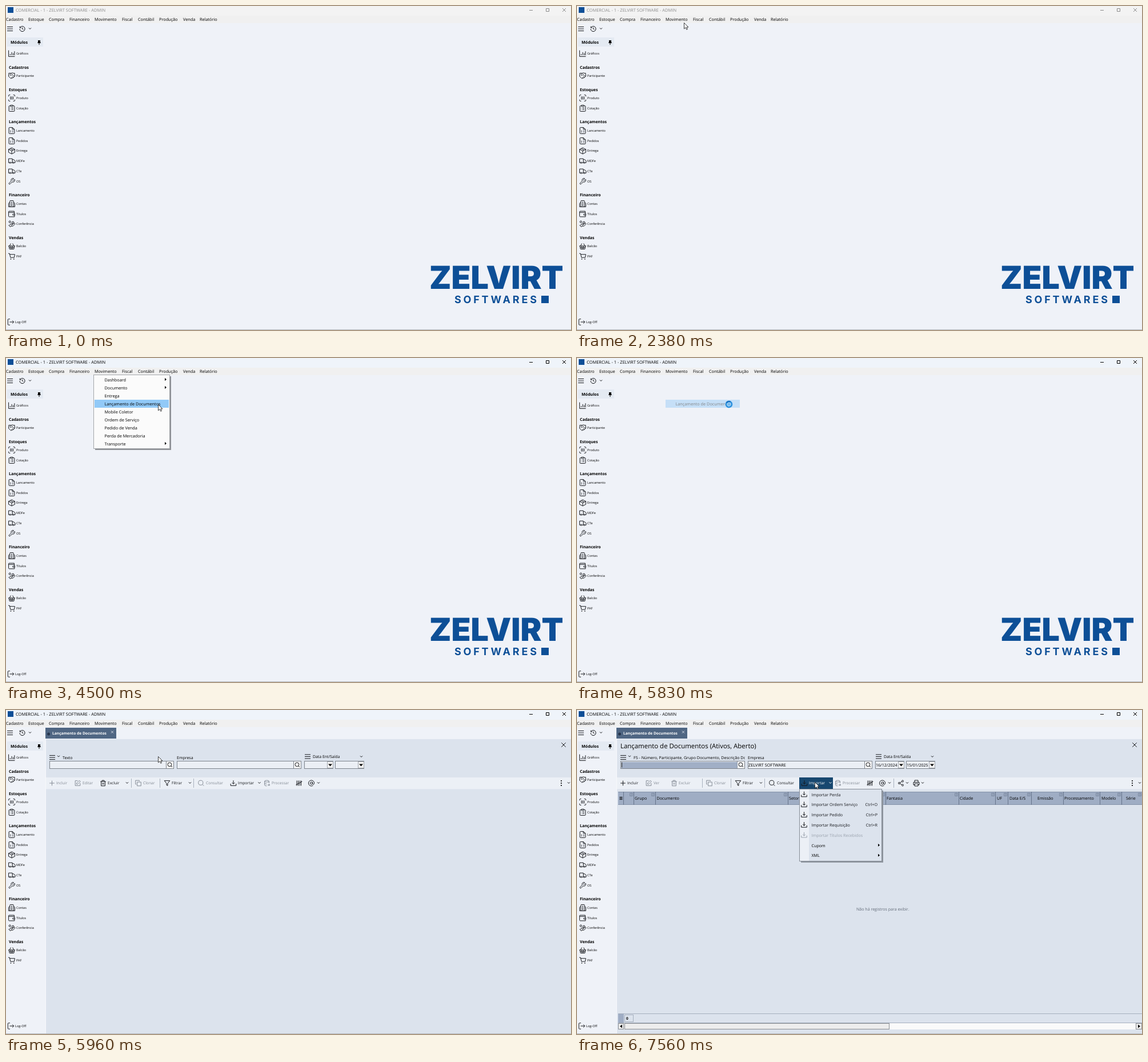
Write an HTML page that moves like this. It is 989 by 567 pixels and loops after 8000 ms.

```html
<!DOCTYPE html>
<html lang="pt-BR">
<head>
<meta charset="utf-8">
<title>Comercial</title>
<style>
html, body { margin: 0; width: 100%; height: 100%; overflow: hidden; background: #eff2f8; }
svg { display: block; width: 989px; height: 567px; font-family: "Open Sans", "Noto Sans", sans-serif; text-rendering: geometricPrecision; }
text { white-space: pre; }
</style>
</head>
<body>
<svg id="stage" viewBox="0 0 989 567"></svg>
<script>
const LOOP = 8000, INK = '#000', LINE = '#16181c', GREY = '#848b95', PANE = '#dce3ed', BAR = '#ecf0f6', STEEL = '#9fadc4', BLUE = '#0d4f97';
const ring = (x, y, r) => `M${x - r} ${y}a${r} ${r} 0 1 0 ${2 * r} 0a${r} ${r} 0 1 0-${2 * r} 0`;

// Icon outlines on a 24 unit square
const ICONS = {
  menu: 'M2 5h20M2 12h20M2 19h20',
  history: 'M3 3v5h5M3.4 8a9.5 9.5 0 1 1-.9 4M12 7v5l4 2',
  down: 'M5 8l7 7 7-7',
  close: 'M3 3l18 18M21 3L3 21',
  chart: 'M2 2v20h20M7 18v-4M12 18V8M17 18v-7M21 18V5',
  hands: 'M11 17l2 2a1 1 0 1 0 3-3M14 14l2.5 2.5a1 1 0 1 0 3-3l-3.9-3.9a3 3 0 0 0-4.2 0l-.9.9a1 1 0 1 1-3-3l2.8-2.8a5.8 5.8 0 0 1 7-.9l.5.3 3.2-.2M21 3l1 11h-2M3 3L2 14l6.5 6.5a1 1 0 1 0 3-3M3 4h8',
  scan: 'M2 7V4a2 2 0 0 1 2-2h3M17 2h3a2 2 0 0 1 2 2v3M22 17v3a2 2 0 0 1-2 2h-3M7 22H4a2 2 0 0 1-2-2v-3M8 7v10M12 7v10M16.5 7v10',
  clip: 'M8 4H5a2 2 0 0 0-2 2v14a2 2 0 0 0 2 2h14a2 2 0 0 0 2-2V6a2 2 0 0 0-2-2h-3M8 2h8v4H8zM11 11h6M11 16h6M7 11h1M7 16h1',
  sheet: 'M14 2H5a2 2 0 0 0-2 2v16a2 2 0 0 0 2 2h14a2 2 0 0 0 2-2V8zM14 2v6h6M7 13h3M14 13h3M7 17h3M14 17h3',
  box: 'M22 7l-10-5L2 7v10l10 5 10-5zM2 7l10 5 10-5M12 12v10M7 4.5l10 5',
  truck: 'M14 18V5H2v13h3M9 18h6M19 18h4v-6l-4-4h-5' + ring(7, 18, 2) + ring(17, 18, 2),
  wrench: 'M14.7 6.3a1 1 0 0 0 0 1.4l1.6 1.6a1 1 0 0 0 1.4 0l3.8-3.8a6 6 0 0 1-8 8l-6.9 6.9a2.1 2.1 0 0 1-3-3l6.9-6.9a6 6 0 0 1 8-8z',
  tower: 'M6 22V4a2 2 0 0 1 2-2h8a2 2 0 0 1 2 2v18zM6 9H4a2 2 0 0 0-2 2v11h20V11a2 2 0 0 0-2-2h-2M10 7h4M10 11h4M10 15h4M10 18h4',
  wallet: 'M20 7V3H4a2 2 0 0 0 0 4h17v5h-4a2 2 0 0 0 0 4h4v5H4a2 2 0 0 1-2-2V5M21 12h1v4h-1',
  coins: 'M2 16l6 6M9 15h4a2 2 0 1 0 0-4h-3l-7 6M7 21l3-2h4l3-1 5-5a2 2 0 0 0-3-3l-4 4' + ring(16, 7, 3) + ring(6, 5, 3),
  basket: 'M5 11l4-8M19 11l-4-8M1 11h22M3 11l2 10h14l2-10M9 11l1 10M15 11l-1 10M4 16h16',
  cart: 'M1 3h4l3 13h12l2-10H6' + ring(9, 21, 1) + ring(19, 21, 1),
  exit: 'M9 22H4a2 2 0 0 1-2-2V4a2 2 0 0 1 2-2h5M17 17l5-5-5-5M22 12H8',
  plus: 'M12 3v18M3 12h18',
  edit: 'M12 3H3v18h18v-9M18 2l4 4-10 10H8v-4z',
  trash: 'M2 6h20M8 6V2h8v4M5 6v16h14V6M10 11v6M14 11v6',
  copy: 'M8 8h14v14H8zM5 16H2V2h14v3',
  filter: 'M2 3h20l-8 10v8l-4-2v-6z',
  find: ring(10.5, 10.5, 8.5) + 'M17 17l5 5',
  load: 'M2 14v7h20v-7M12 2v13M7 10l5 5 5-5',
  data: 'M3 5c0-4 16-4 16 0s-16 4-16 0v14c0 2 4 3 8 3M19 5v7M3 12c0 2 4 3 8 3M15 18h7l-3-3M22 20h-7',
  tally: 'M4 3v18M9 3v18M14 3v18M19 3v18M1 18L23 6',
  at: ring(12, 12, 4) + 'M16 8v5a3 3 0 0 0 6 0v-1a10 10 0 1 0-4 8',
  share: ring(18, 5, 3) + ring(6, 12, 3) + ring(18, 19, 3) + 'M8.6 13.5l7 4M15.5 6.5l-7 4',
  print: 'M6 9V2h12v7M6 18H2V9h20v9h-4M6 14h12v8H6z'
};

const rect = (x, y, w, h, fill, stroke = 'none', id = '') =>
  `<rect id="${id}" x="${x}" y="${y}" width="${w}" height="${h}" fill="${fill}" stroke="${stroke}"/>`;
const path = (d, fill, stroke = 'none') => `<path d="${d}" fill="${fill}" stroke="${stroke}"/>`;
const text = (x, cy, s, size = 7.3, fill = INK, extra = '') =>
  `<text x="${x}" y="${cy + size * .36}" font-size="${size}" fill="${fill}" ${extra}>${s}</text>`;
const bold = (x, cy, s, size = 7, fill = INK) => text(x, cy, s, size, fill, 'font-weight="700"');
const icon = (name, cx, cy, size = 13, color = LINE) =>
  `<path d="${ICONS[name]}" transform="translate(${cx - size / 2} ${cy - size / 2}) scale(${size / 24})" fill="none" stroke="${color}" vector-effect="non-scaling-stroke"/>`;
const chevron = (x, y, color) => icon('down', x, y, 7, color);
const group = (id, body) => `<g id="${id}">${body}</g>`;
const arrow = (x, y) => path(`M${x} ${y - 2.5}l3 2.5-3 2.5z`, INK);

function sideBar() {
  const heads = [['Cadastros', 107], ['Estoques', 146], ['Lançamentos', 202.5], ['Financeiro', 330.5], ['Vendas', 405]];
  const items = [['chart', 'Gráficos', 83], ['hands', 'Participante', 122], ['scan', 'Produto', 161], ['clip', 'Cotação', 179],
    ['sheet', 'Lancamento', 218], ['sheet', 'Pedidos', 236], ['box', 'Entrega', 253.5], ['truck', 'MDFe', 271],
    ['truck', 'CTe', 289], ['wrench', 'OS', 307], ['tower', 'Contas', 346], ['wallet', 'Títulos', 364],
    ['coins', 'Conferência', 381.5], ['basket', 'Balcão', 420.5], ['cart', 'PAF', 438]];
  return rect(2, 55, 63, 16, '#e4eaf2') + bold(8, 63, 'Módulos') +
    path('M56 60h4v3l1 2h-2.5v3h-1v-3H55l1-2z', INK) +
    heads.map(([s, y]) => bold(5, y, s)).join('') +
    items.map(([i, s, y]) => icon(i, 10, y) + text(18, y, s, 5.5, INK, 'font-weight="500"')).join('') +
    icon('exit', 8.5, 553, 12.5) + text(16, 553, 'Log-Off', 5.6, INK, 'font-weight="500"');
}

function frame() {
  const menus = [['Cadastro', 0], ['Estoque', 39], ['Compra', 75], ['Financeiro', 111], ['Movimento', 155], ['Fiscal', 203],
    ['Contábil', 231], ['Produção', 268], ['Venda', 310], ['Relatório', 339]];
  return rect(0, 0, 989, 567, '#eff2f8') + rect(0, 0, 989, 17, '#f3f3f3', 'none', 'capBg') + rect(3, 2, 10, 10, BLUE) +
    group('capInk', text(17, 7.5, 'COMERCIAL - 1 - ZELVIRT SOFTWARE - ADMIN', 7.5, 'currentColor') +
      path('M916 7.5h6M945.5 4.5h5v5h-5zM974 4l6 6M980 4l-6 6', 'none', 'currentColor')) +
    rect(0, 17, 989, 13, '#f0f0f0') + menus.map(([s, x]) => text(x, 23.5, s)).join('') +
    icon('menu', 7, 40, 12) + icon('history', 28.5, 40, 11.5) + chevron(42, 39.5) + sideBar() +
    text(741, 474.7, 'ZELVIRT', 55.5, BLUE, 'font-family="Inter, sans-serif" font-weight="900"') +
    text(785, 513.5, 'SOFTWARES', 18, BLUE, 'font-family="Inter, sans-serif" font-weight="700" letter-spacing="3.8"') +
    rect(937, 507, 13, 13, BLUE);
}

const MOVES = ['Dashboard', 'Documento', 'Entrega', 'Lançamento de Documentos', 'Mobile Coletor', 'Ordem de Serviço',
  'Pedido de Venda', 'Perda de Mercadoria', 'Transporte'];

function moveMenu() {
  return rect(156, 32, 133, 129, '#8f9297') + rect(153.5, 29.5, 133, 129, '#fbfbfb', '#a3a6aa') +
    rect(155, 31, 130, 14, '#91c9f7', 'none', 'mark') +
    MOVES.map((s, i) => text(172.5, 38 + 14 * i, s)).join('') + [0, 1, 8].map(i => arrow(278, 37.5 + 14 * i)).join('');
}

// Tool bar: grey while loading, then partly swapped
function toolBar(ready) {
  const on = c => c ? LINE : GREY;
  const tool = (name, x, label, lx, c) => icon(name, x, 128, 11.5, c) + text(lx, 128, label, 6.65, c);
  return tool('plus', 80.5, 'Incluir', 88, on(ready)) +
    tool('edit', 125.5, ready ? 'Ver' : 'Editar', 134, GREY) +
    tool('trash', 170, 'Excluir', 178, on(!ready)) + (ready ? '' : chevron(212, 127.5)) +
    tool('copy', 231.5, 'Clonar', 240, GREY) + tool('filter', 282, 'Filtrar', 290, LINE) + chevron(322, 127.5) +
    tool('find', 341.5, 'Consultar', 350, on(ready)) + tool('data', 457, 'Processar', 465, GREY) +
    icon('tally', 513, 128, 12) + icon('at', 534.5, 128, 12) + chevron(547, 127.5) +
    path('M219.5 120v16M269.5 120v16M328.5 120v16', 'none', '#a9b2bf') +
    (ready ? path('M554.5 120v16', 'none', '#a9b2bf') + icon('share', 567, 128, 12) + chevron(578, 127.5) +
      icon('print', 594, 128, 12) + chevron(605, 127.5) : '');
}

function pane() {
  const search = x => rect(x + .5, 89.5, 217, 13, '#ebeff5', '#7d838c') +
    rect(x + 205, 90, 12, 12, '#f7f7f7') + path(`M${x + 204.5} 90v12`, 'none', '#7d838c') + icon('find', x + 211, 96, 9.5);
  const date = x => rect(x + .5, 89.5, 50, 13, '#ebeff5', '#7d838c') + rect(x + 40.5, 90.5, 10, 11, '#f5f5f5', '#a0a5ac') +
    path(`M${x + 42} 94.5h7l-3.5 4z`, INK);
  return rect(69, 31, 124, 19, '#4f6683') + bold(81, 41, 'Lançamento de Documentos', 6.65, '#fff') +
    path(ring(74.5, 42, 2.5), '#26354d') + icon('close', 186, 38.5, 5.5, '#d5dce6') +
    rect(70, 51, 919, 516, PANE) + path('M69.5 50v517', 'none', '#f6f8fb') + rect(70, 118, 919, 20.5, BAR) +
    icon('close', 976, 61, 10) + icon('menu', 81, 83, 12) + chevron(92, 81) +
    text(299, 83.5, 'Empresa', 7) + icon('menu', 528, 81.5, 12) + text(537, 82, 'Data Ent/Saída', 6.9) + chevron(622, 81.5) +
    search(76) + search(299) + date(522) + date(576) +
    group('wait', toolBar(false)) + group('ready', toolBar(true)) +
    group('blank', text(99, 83.5, 'Texto', 7)) +
    [124, 128, 132].map(y => path(ring(972, y, 1.1), INK)).join('') + chevron(985, 127.5) +
    group('grid', grid()) +
    group('named', text(76, 63, 'Lançamento de Documentos (Ativos, Aberto)', 11.45) +
      `<g clip-path="url(#label)">${text(99, 83.5, 'F5 - Número, Participante, Grupo Documento, Descrição Documento', 7.1)}</g>` +
      rect(77.5, 91, 203, 11, '#a1afc6') + rect(83.5, 533.5, 15, 12, PANE, '#a5afbe') + bold(86, 540, '0', 6.5)) +
    group('caret', path('M78.5 91.5v9', 'none', '#222')) +
    rect(389, 118, 59, 20, '#17476f', 'none', 'hover') + icon('load', 398, 128, 11.5) +
    group('impInk', text(406, 128, 'Importar', 6.75, 'currentColor') + chevron(443.5, 127.5, 'currentColor'));
}

function grid() {
  const edges = [81, 99, 137, 369, 540, 668, 732, 754, 795, 851, 915, 953];
  const cols = [['Grupo', 101], ['Documento', 139.5], ['Setor', 371], ['Fantasia', 542], ['Cidade', 670], ['UF', 735],
    ['Data E/S', 757], ['Emissão', 806], ['Processamento', 853], ['Modelo', 918], ['Série', 961]];
  return text(300, 96, 'ZELVIRT SOFTWARE', 7.3) + text(523, 96, '16/12/2024', 7.1) + text(577, 96, '15/01/2025', 7.1) +
    rect(72, 143, 917, 23, STEEL) + path('M72 143.5h917M72 165.5h917', 'none', '#8492a9') +
    edges.map(x => path(`M${x + .5} 143v23`, 'none', '#66748b')).join('') +
    [...edges.slice(1), 989].map(x => path(`M${x - 6.5} 145.5h5v5h-5zM${x - 5} 147h2.5M${x - 4} 147v3`, 'none', '#7d8ba2')).join('') +
    path('M74.5 152.5h5M74.5 154.5h5M74.5 156.5h5', 'none', INK) +
    cols.map(([s, x]) => text(x, 154.5, s, 7.2)).join('') +
    text(489, 348.5, 'Não há registros para exibir.', 7.05, '#626b78') +
    path('M72 531.5h917M72 547.5h917', 'none', '#a5afbe') + rect(72, 532, 10, 15, STEEL) +
    rect(72, 548, 917, 11, '#fafafa') +
    [[72, 10], [83, 464], [978, 11]].map(([x, w]) => rect(x + .5, 548.5, w - 1, 10, '#ededed', '#8a8d92')).join('') +
    path('M79 550.5v6l-4-3zM982 550.5v6l4-3z', INK);
}

function importMenu() {
  const rows = [['Perda', ''], ['Ordem Serviço', 'Ctrl+O'], ['Pedido', 'Ctrl+P'], ['Requisição', 'Ctrl+R'], ['Títulos Recebidos', '']];
  const y = i => 148 + 17.8 * i;
  return rect(392, 141, 144, 126, '#8f969f') + rect(389.5, 138.5, 144, 126, PANE, '#858c96') + rect(390, 139, 16, 125, BAR) +
    rows.map(([s, key], i) => {
      const c = i == 4 ? '#9aa2ad' : LINE;
      return icon('load', 397.5, y(i) - .5, 11.5, c) + text(410.5, y(i), 'Importar ' + s, 7.15, c) +
        text(526, y(i), key, 7.15, c, 'text-anchor="end"');
    }).join('') +
    ['Cupom', 'XML'].map((s, i) => text(410.5, y(5 + i), s, 7.15) + arrow(527, y(5 + i) - .5)).join('');
}

const stage = document.getElementById('stage');
stage.innerHTML = `<defs><clipPath id="label"><rect x="98" y="76" width="196" height="14"/></clipPath></defs>` +
  frame() + group('moves', moveMenu()) +
  group('chosen', rect(155, 73, 130, 14, '#91c9f7') + text(172.5, 80, MOVES[3])) +
  group('pane', pane()) + group('imports', importMenu()) + rect(0, 566, 989, 1, '#b4b8be') +
  group('busy', `<circle r="5" fill="#a9d5f4" stroke="#2e92de" stroke-width="2.6"/><path d="M0-5a5 5 0 0 1 5 5" fill="none" stroke="#1673c4" stroke-width="2.6"/><circle r="1.5" fill="none" stroke="#4a9fe0"/>`) +
  group('pointer', `<path d="M.5.5v10.5l2.5-2.4 1.8 3.7 1.7-.8-1.7-3.5H8z" fill="#fff" stroke="#111" stroke-width=".8"/>`);

const $ = id => document.getElementById(id);
const show = (id, on) => $(id).style.display = on ? '' : 'none';
const clamp = v => Math.max(0, Math.min(1, v));
const smooth = p => p * p * (3 - 2 * p), out = p => 1 - (1 - p) ** 2, even = p => p;

// time, x, y, easing on the way to this point
const PATH = [[124, 767, 506], [385, 360, 304, smooth], [1400, 360, 304], [1451, 357, 302, even], [2245, 188, 33, smooth],
  [2310, 188, 33], [2440, 187, 26, smooth], [2930, 187, 26], [3111, 198, 46, even], [3780, 216, 79, out], [3800, 216, 79],
  [4430, 267, 81, smooth], [4500, 266, 81, even], [6400, 266, 81], [7220, 416, 126, smooth]];

function pointerAt(t) {
  const i = PATH.findIndex(k => k[0] > t);
  if (i < 1) return (i ? PATH[PATH.length - 1] : PATH[0]).slice(1, 3);
  const [a, b] = [PATH[i - 1], PATH[i]], p = (b[3] || even)((t - a[0]) / (b[0] - a[0]));
  return [1, 2].map(n => a[n] + (b[n] - a[n]) * p);
}

function draw(now) {
  // the screen refreshes in steps of about 1/15 s
  const STEP = 66.4, t = 123 + STEP * Math.floor((now % LOOP - 115) / STEP);
  const [x, y] = pointerAt(t), active = t > 2445, busy = t > 5690 && t < 5955;
  $('capBg').setAttribute('fill', active ? '#eff4fa' : '#f3f3f3');
  $('capInk').style.color = active ? INK : '#8b8b8b';

  show('moves', active && t < 5555);
  $('moves').style.opacity = clamp((t - 2400) / 220);
  const row = Math.floor((y - 31) / 14);
  show('mark', row >= 0);
  $('mark').setAttribute('y', 31 + 14 * Math.max(0, row));
  show('chosen', t >= 5555 && t < 5955);
  $('chosen').style.opacity = clamp(1 - (t - 5560) / 490);

  show('pane', t > 5955);
  show('grid', t > 6220);
  show('ready', t > 6350);
  show('wait', t <= 6350);
  show('named', t > 6425);
  show('blank', t <= 6425);
  show('caret', t > 6425 && Math.floor((t - 6425) / 530) % 2 == 0);
  const hover = t > 6425 && x > 389 && y > 118;
  show('hover', hover);
  $('impInk').style.color = hover ? '#fff' : LINE;
  show('imports', t > 7285);
  $('imports').style.opacity = clamp((t - 7230) / 240);

  show('busy', busy);
  $('busy').setAttribute('transform', `translate(266 81) rotate(${t * .36})`);
  show('pointer', t > 120 && !busy);
  $('pointer').setAttribute('transform', `translate(${Math.round(x)} ${Math.round(y)})`);
}

const start = performance.now();
(function loop() {
  draw(performance.now() - start);
  requestAnimationFrame(loop);
})();
</script>
</body>
</html>
```
